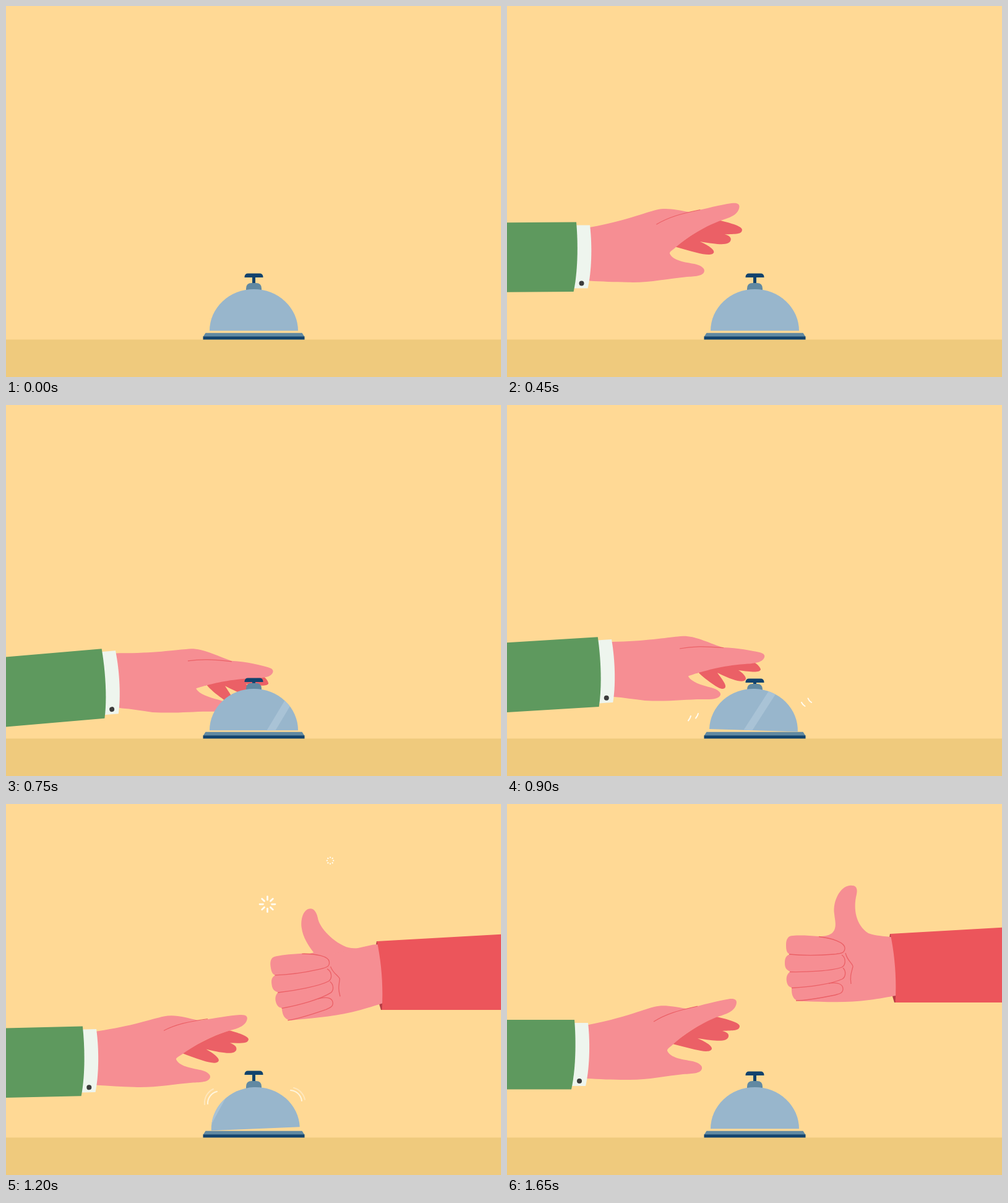
Write an HTML page with a canvas that moves like this. It is 800 px wide and 600 px high and loops after 2130 ms.

```html
<!DOCTYPE html>
<html lang="en">
<head>
<meta charset="utf-8">
<title>Service bell</title>
<style>
  html, body { margin: 0; width: 100%; height: 100%; overflow: hidden; background: #ffd995; }
  canvas { display: block; width: 800px; height: 600px; }
</style>
</head>
<body>
<canvas id="stage" width="800" height="600"></canvas>
<script>
const ctx = document.getElementById('stage').getContext('2d');
const LOOP = 2130, STEP = 30;
const COLOR = {
  wall: '#ffd995', table: '#efca7d', skin: '#f68e93', shade: '#eb6066',
  green: '#5e995e', cuff: '#eef5ee', button: '#3c3c3c', red: '#ec555b', darkRed: '#b53c44',
  dome: '#98b6cc', shine: '#a9c3d6', steel: '#6189a2', navy: '#12436d', white: '#fffdf4'
};

// Tracks: time, then one value per column.
const LEFT_ARM = [ // cuff x, cuff y, tilt, bend, reach
  [90, -222, 388, 3, .45, -3], [270, 19, 365, 1.1, .22, -3], [420, 122, 354, 0, 0, 0],
  [540, 160, 359, -1.5, .5, 6], [630, 175, 370, -3, 1.03, 10], [765, 177, 398, -5, 1.1, 6],
  [900, 169, 379, -3.5, 1, 0], [1020, 160, 373, -2.9, .58, 2], [1200, 146, 364, -1.4, .26, 2],
  [1650, 131, 354, 0, 0, 0]
];
const RIGHT_ARM = [ // corner x, corner y, tilt
  [900, 960, 70, 36], [960, 785, 140, 23], [1020, 688, 191, 12.3], [1110, 622, 217, 3],
  [1200, 599, 222, 0], [1330, 614, 213, 0], [1650, 619, 210, 0]
];
const RIGHT_HAND = [ // wrist x, wrist y, tilt, scale, thumb
  [900, 928, 115, 50, .95, 0], [960, 767, 189, 35, .95, 0], [1020, 682, 242, 22.6, .95, 0],
  [1110, 620, 272, 4, .98, .4], [1200, 600, 277, -7.6, 1, 1], [1330, 615, 268, 1, 1, 1.75],
  [1650, 620, 265, 0, 1, 2]
];
const BELL = [ // knob drop, neck drop, dome drop, tilt
  [690, 0, 0, 0, 0], [765, 10, 2, 1, 0], [820, 11, 3, 1, -2], [900, 10, 3, 1, 1.8],
  [1020, 1, 1, 1, 0], [1200, -1, 0, 0, -2.4], [1300, 0, 0, 0, 1.6], [1410, 0, 0, 0, -1],
  [1530, 0, 0, 0, .5], [1650, 0, 0, 0, 0]
];
const SHINE = [[540, 478], [630, 451], [900, 384], [1020, 348], [1200, 309], [1320, 270]];
const TICKS = [[770, 0, -14], [810, 1, -8], [900, .95, 0], [960, 0, 4]]; // alpha, spread
const ARCS = [ // inner left, inner right, outer, lift
  [930, 0, 0, 0, 0], [1020, 1, .6, 0, 0], [1110, .9, .8, 0, 2], [1200, .75, .75, .4, 4], [1320, 0, 0, 0, 6]
];

// Monotone cubic sampling of every column.
function sample(track, t) {
  const last = track.length - 1;
  if (t <= track[0][0]) return track[0].slice(1);
  if (t >= track[last][0]) return track[last].slice(1);
  const i = track.findIndex(k => k[0] > t) - 1;
  const slope = (j, c) => (track[j + 1][c] - track[j][c]) / (track[j + 1][0] - track[j][0]);
  const tangent = (j, c) => {
    if (j === 0) return slope(0, c);
    if (j === last) return 0;
    const a = slope(j - 1, c), b = slope(j, c);
    return a * b > 0 ? 2 * a * b / (a + b) : 0;
  };
  const [from, to] = [track[i], track[i + 1]];
  const span = to[0] - from[0], u = (t - from[0]) / span, v = 1 - u;
  return from.slice(1).map((_, n) => {
    const c = n + 1;
    return from[c] * (1 + 2 * u) * v * v + to[c] * u * u * (3 - 2 * u)
      + span * u * v * (tangent(i, c) * v - tangent(i + 1, c) * u);
  });
}

const NUMBER = /-?[\d.]+/g;
function morph(a, b, k) {
  const target = b.match(NUMBER);
  let i = 0;
  return a.replace(NUMBER, n => (+n + (target[i++] - n) * k).toFixed(2));
}

const fill = (path, color) => { ctx.fillStyle = color; ctx.fill(new Path2D(path)); };
function line(path, color, width, alpha = 1) {
  ctx.globalAlpha = alpha;
  ctx.strokeStyle = color;
  ctx.lineWidth = width;
  ctx.stroke(new Path2D(path));
  ctx.globalAlpha = 1;
}

// Runs draw with the point (ox, oy) moved to (x, y), turned and scaled.
function placed(x, y, degrees, ox, oy, draw, scale = 1) {
  ctx.save();
  ctx.translate(x, y);
  ctx.rotate(degrees * Math.PI / 180);
  ctx.scale(scale, scale);
  ctx.translate(-ox, -oy);
  draw();
  ctx.restore();
}

// Left hand: [relaxed, pressing]
const FINGERS = [
  'M264 390 C285 375 310 355 338 344 C352 347 376 353 376 359 C376 367 366 366 348 367 C356 369 359 372 358 376 C356 385 340 384 308 379 C320 384 332 391 331 396 C329 402 316 400 303 397 C290 394 276 390 264 387 Z',
  'M306 434 C330 424 360 420 399 416 C405 419 410 425 410 428 C408 433 396 432 374 429 C382 434 386 439 386 443 C384 449 372 449 340 433 C347 443 354 451 353 456 C351 462 342 458 335 453 C325 446 316 440 308 431 Z'
];
const PALM = [
  'M114 361 L132 357 C185 347 218 333 238 328 C254 324 270 328 290 331 C318 325 340 318 358 315.5 C368 314 371 317 371 321 C370 335 354 340 338 345 C300 361 278 380 267 390 C261 395 259 396 259 399 C264 411 284 413 300 416 C312 419 316 424 315 428 C313 436 300 436 285 437 C255 440 225 447 192 446 C170 446 148 445 129 444 L112 443 Z',
  'M152 384 L169 383 C225 382 258 376 276 374.5 C300 371 318 382 348 392 C375 393 394 397 408 400 C416 402 417 405 416 408 C413 417 398 418 384 419 C345 422 325 429 306 434 C297 437 293 438 293 439 C298 448 314 453 330 457 C341 460 346 465 345 469 C342 476 331 476 316 476 C286 476 262 480 223 478 C205 476 188 473 172 472 L154 469 Z'
];
const CREASE = ['M237 352 C256 340 276 334 308 327', 'M279 394 C300 390 318 390 350 392.5'];

function drawLeftArm(t) {
  const [x, y, tilt, bend, reach] = sample(LEFT_ARM, t);
  placed(x + reach, y, 0, 131 + 38 * bend, 354 + 25 * bend, () => {
    fill(morph(...FINGERS, bend), COLOR.shade);
    fill(morph(...PALM, bend), COLOR.skin);
    line(morph(...CREASE, bend), COLOR.shade, 1.2);
  });
  placed(x, y, tilt, 131, 354, () => {
    fill('M104 354 H131 C135 390 133 430 127 456 H100 Z', COLOR.cuff);
    fill('M113 448 a4 4 0 1 0 8 0 a4 4 0 1 0 -8 0', COLOR.button);
    fill('M-500 349 H109 C112 385 111 430 104 461.5 H-500 Z', COLOR.green);
  });
}

// Right thumb: [folded, leaning, upright]
const THUMB = [
  'M605 214.5 C593 210 572 209 549 209 C525 206.5 514 195.5 505 189 C500 184 496 183 493 184.5 C487 187 485 197 489 208 C491 212 492 214 494 215 C497 215 500 215 504 215 L540 260 L650 260 L650 217 Z',
  'M622 218 C601 219 588 218 576.5 213 C552 198.5 537 173 537 160 C536 148 531 144 527 144 C516 143 509 158 509 173 C509 188 516 203 523 215 C518 216 512 216 504 216 L540 260 L650 260 L650 217 Z',
  'M620 215 C600 213 592 212 584 209 C564 196 559 170 565 146 C568 132 560 131 553 132 C538 134 526 158 529 178 C530 188 532 194 530 201 C527 212 516 214 504 214 L540 260 L650 260 L650 217 Z'
];
const FIST = 'M650 217 L620 215 L540 222 L504 214 C490 213 475 212 462 213 C454 213 451 219 451 228 C451 236 452 241 457 243 C449 246 449 252 449 258 C449 265 452 269 458 271 C452 275 451 281 452 287 C453 293 456 296 460 297 C460 303 460 308 463 313 C466 318 471 319 480 319 C515 320 550 322 585 317 C602 315 616 312 628 310 L650 312 Z';
const FOLDS = [
  'M504 214.5 C526 217 546 224 546 233 C546 242 538 242 528 243 C505 245 475 245 456 243',
  'M541 244 C548 249 548 260 541 264 C525 270 485 272 457 271.5',
  'M543 265 C548 270 548 279 542 283 C525 291 490 296 460 297.5',
  'M520 290 C534 288 543 291 543 299 C543 306 537 307 530 309 C510 313 485 318 467 318',
  'M547 241 C550 254 559 258 559 263 C557 272 554 276 556 291'
];

function drawRightArm(t) {
  const [x, y, tilt] = sample(RIGHT_ARM, t);
  const [wx, wy, turn, scale, thumb] = sample(RIGHT_HAND, t);
  const pose = thumb < 1 ? 0 : 1;
  placed(x, y, tilt, 619, 210, () =>
    fill('M619 210 L618 216 L623 311 L626 321 H636 V210 Z', COLOR.darkRed));
  placed(wx, wy, turn, 620, 265, () => {
    fill(morph(THUMB[pose], THUMB[pose + 1], thumb - pose), COLOR.skin);
    fill(FIST, COLOR.skin);
    FOLDS.forEach(fold => line(fold, COLOR.shade, 1.3));
  }, scale);
  placed(x, y, tilt, 619, 210, () =>
    fill('M619.5 210 C627 245 630 285 627.5 321 H1100 V183 Z', COLOR.red));
}

function drawBell(t) {
  const [knob, neck, drop, tilt] = sample(BELL, t);
  ctx.save();
  ctx.translate(0, knob);
  fill('M398 438 H403 V450 H398 Z M385.5 439 V438 Q386 432.5 391 432.5 H410 Q415 432.5 415.5 438 V439 Z', COLOR.navy);
  ctx.restore();
  ctx.save();
  ctx.translate(0, neck);
  fill('M388 460 V457 Q388 448 397 448 H404 Q413 448 413 457 V460 Z', COLOR.steel);
  ctx.restore();
  fill('M322.5 528.7 H478.5 L482.5 535 H318.5 Z', COLOR.steel);
  fill('M318.5 534.5 H482.5 V539.5 H318.5 Z', COLOR.navy);
  placed(400.5, 459 + drop, tilt, 400.5, 459, () => {
    const dome = 'M329 525.3 A71.5 67.3 0 0 1 472 525.3 Z';
    fill(dome, COLOR.dome);
    if (t < 540 || t > 1320) return;
    ctx.clip(new Path2D(dome));
    const [x] = sample(SHINE, t);
    fill(`M${x} 526 h14 l42 -70 h-14 Z`, COLOR.shine);
  });
}

function drawRinging(t) {
  ctx.lineCap = 'round';
  if (t > 770 && t < 960) {
    const [alpha, spread] = sample(TICKS, t);
    ctx.save();
    ctx.translate(-spread, -spread / 3);
    line('M297 503 Q296 507 293 510.5 M309 499 Q308 503 305 506.5', COLOR.white, 2, alpha);
    ctx.translate(2 * spread, 0);
    line('M476 481 Q478 485 481.5 487 M486.5 474.5 Q488 478.5 492 481', COLOR.white, 2, alpha);
    ctx.restore();
  }
  if (t > 930 && t < 1320) {
    const [left, right, outer, lift] = sample(ARCS, t);
    ctx.save();
    ctx.translate(-lift / 2, -lift);
    line('M328 489 A19.5 19.5 0 0 1 343 469', COLOR.white, 2, left);
    line('M323 490 A25 25 0 0 1 337 465', COLOR.white, 2, outer);
    ctx.translate(lift, 0);
    line('M458 467 A19.5 19.5 0 0 1 476 484', COLOR.white, 2, right);
    line('M463 463 A25 25 0 0 1 481 482', COLOR.white, 2, outer);
    ctx.restore();
  }
  ctx.lineCap = 'butt';
}

function drawSpark(x, y, age) {
  if (age <= 0 || age >= 240) return;
  const outer = 15 * Math.min(1, .2 + age / 150 * 1.2);
  const inner = age < 90 ? 3 + age / 30 : 6 + (age - 90) * .06;
  ctx.lineCap = 'round';
  for (let i = 0; i < 8; i++) {
    placed(x, y, i * 45, 0, 0, () =>
      line(`M0 ${inner + 1} V${Math.max(inner + 1.2, outer - 1.3)}`, COLOR.white, 1.6 + outer / 12));
  }
  ctx.lineCap = 'butt';
}

function draw(t) {
  fill('M0 0 H800 V600 H0 Z', COLOR.wall);
  fill('M0 539.5 H800 V600 H0 Z', COLOR.table);
  if (t >= 90) drawLeftArm(t);
  if (t >= 930) drawRightArm(t);
  drawBell(t);
  drawRinging(t);
  drawSpark(422.5, 162, t - 1110);
  drawSpark(524, 91.5, t - 1170);
}

const start = performance.now();
function tick() {
  const t = (performance.now() - start) % LOOP;
  draw(Math.min(1650, Math.floor(t / STEP) * STEP));
  requestAnimationFrame(tick);
}
tick();
</script>
</body>
</html>
```
